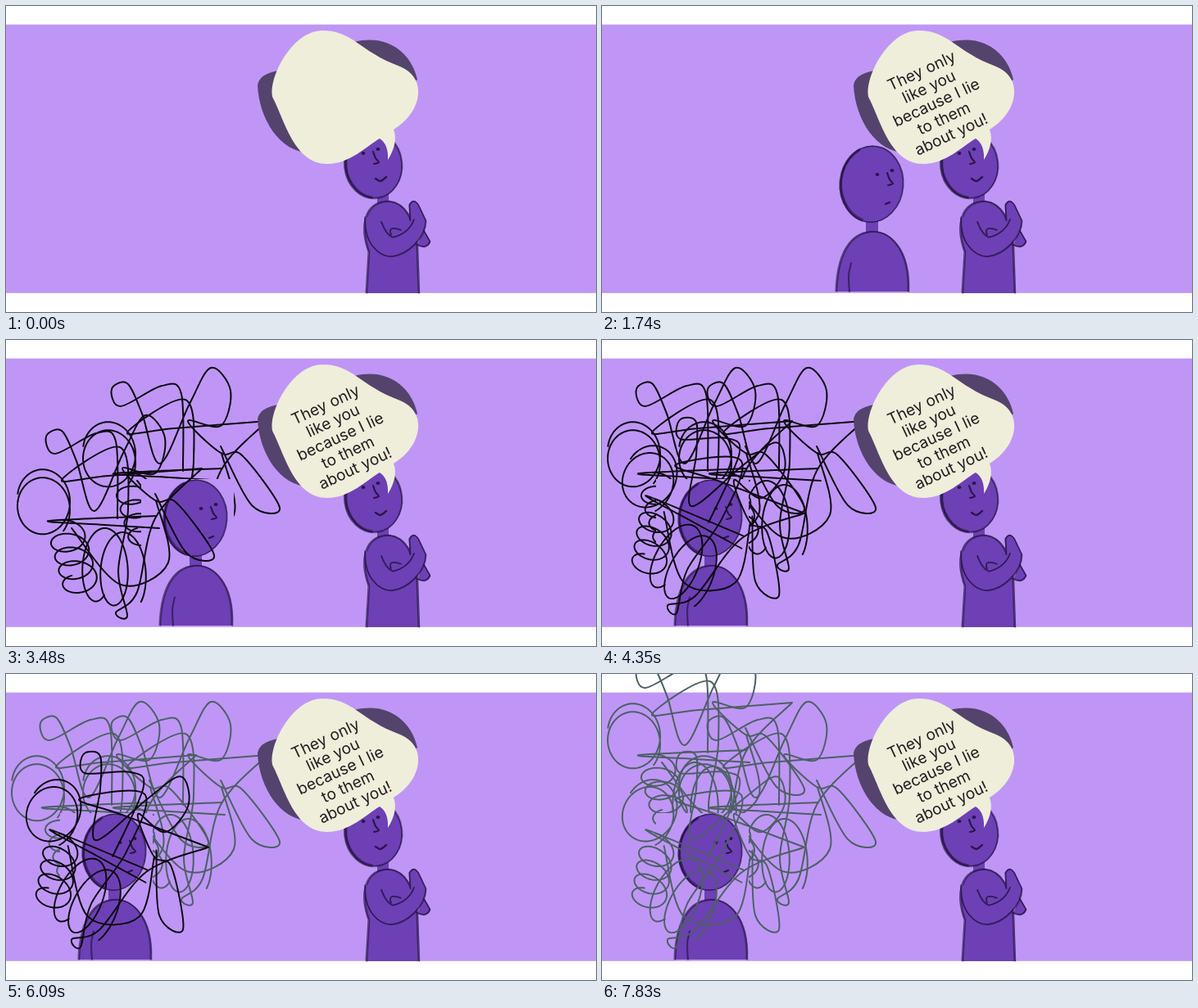
Write an HTML page with a canvas that moves like this. It is 720x374 px and loops after 8 s.

```html
<!DOCTYPE html>
<html lang="en">
<head>
<meta charset="utf-8">
<title>Speech bubble and tangled thoughts</title>
<style>
  html, body { margin: 0; width: 100%; height: 100%; overflow: hidden; background: #fff; }
  canvas { display: block; }
</style>
</head>
<body>
<canvas id="stage" width="720" height="374"></canvas>
<script>
const ctx = document.getElementById('stage').getContext('2d');
const LOOP = 8000, STEP = 870;
const LILAC = '#bf96f6', SKIN = '#6d40b6', INK = '#281646';
const CREAM = '#efeeda', SHADE = '#54436c', BLACK = '#0b0810', SLATE = '#4c6064';
const LINES = ['They only', 'like you', 'because I lie', 'to them', 'about you!'];

let seed;
const random = () => (seed = (seed * 16807) % 2147483647) / 2147483647;
const mix = (a, b, t) => a + (b - a) * t;

// Smooth line through key points given as x, y pairs.
function thread(...p) {
  const path = new Path2D(), n = p.length / 2;
  const at = i => {
    const k = 2 * Math.max(0, Math.min(n - 1, i));
    return [p[k], p[k + 1]];
  };
  path.moveTo(p[0], p[1]);
  for (let i = 0; i < n - 1; i++) {
    const [a, b, c, d] = [-1, 0, 1, 2].map(k => at(i + k));
    path.bezierCurveTo(
      b[0] + (c[0] - a[0]) / 6, b[1] + (c[1] - a[1]) / 6,
      c[0] - (d[0] - b[0]) / 6, c[1] - (d[1] - b[1]) / 6, ...c);
  }
  return path;
}

// Elliptic loops whose centre drifts from one point to another.
function coil(x0, y0, x1, y1, rx, ry, turns, start = 0) {
  const path = new Path2D();
  for (let t = 0; t <= 1; t += 0.005) {
    const angle = start + t * turns * 2 * Math.PI;
    path.lineTo(mix(x0, x1, t) + rx * Math.cos(angle), mix(y0, y1, t) + ry * Math.sin(angle));
  }
  return path;
}

function oval(x, y, rx, ry, tilt = 0, from = 0, to = 2 * Math.PI) {
  const path = new Path2D();
  path.ellipse(x, y, rx, ry, tilt, from, to);
  return path;
}

const tangle = [
  thread(319, 99, 205, 108, 148, 113, 219, 73, 229, 148, 217, 225, 228, 279, 214, 275, 240, 250, 262, 160, 319, 99),
  thread(216, 160, 214, 66, 190, 56, 140, 81, 129, 60, 148, 53, 166, 90, 188, 151, 224, 78, 250, 34,
    274, 62, 262, 105, 222, 99, 262, 138, 288, 141, 334, 205, 300, 202, 262, 130),
  thread(263, 157, 132, 163, 200, 168, 267, 172),
  thread(160, 172, 220, 241, 278, 214, 263, 138),
  coil(126, 135, 126, 151, 32, 37, 1.6, -3),
  coil(153, 176, 172, 243, 22, 15, 4, -2),
  coil(188, 215, 232, 225, 22, 46, 2, 1)
];

const listenerBody = new Path2D('M286 349C288 290 312 276 331 276S376 295 374 349');
const speakerTorso = new Path2D('M440 351L443 301C432 270 437 239 468 239Q496 242 502 294L504 351');
const foldedArm = new Path2D('M438 258C436 290 455 306 470 306C490 304 512 283 512 262L503 243Q497 234 492 243L493 262');
const elbow = new Path2D('M510 274L518 288Q514 298 502 292');
const armFolds = new Path2D('M458 264Q464 280 472 283Q492 278 498 261M470 280Q465 268 482 274');
const bubbleShade = new Path2D('M307 97Q309 83 332 79L425 44C470 33 496 62 502 90L371 179C336 180 309 140 307 97');
const bubbleShape = new Path2D('M386 30C424 30 430 55 481 74C515 88 508 130 473 151Q479 167 466 188Q467 169 456 162C440 171 420 193 392 193C352 193 340 140 326 113C318 92 348 30 386 30');

function fill(path, color) {
  ctx.fillStyle = color;
  ctx.fill(path);
}

// Pencil line: several thin, slightly shifted passes.
function pencil(path, spread = 0.8, passes = 3) {
  const shift = () => (random() * 2 - 1) * spread;
  ctx.strokeStyle = INK;
  ctx.lineWidth = 1.2;
  ctx.globalAlpha = 0.5;
  for (let i = 0; i < passes; i++) {
    ctx.save();
    ctx.translate(shift(), shift());
    ctx.stroke(path);
    ctx.restore();
  }
  ctx.globalAlpha = 1;
}

function head(x, y, rx, ry, tilt) {
  fill(oval(x, y, rx, ry, tilt), SKIN);
  pencil(oval(x, y, rx, ry, tilt));
  pencil(oval(x + 1, y, rx, ry, tilt, 1.8, 4.2), 1.6, 6);
}

function face(x, y) {
  fill(oval(x - 9, y + 2, 2.4, 2), INK);
  fill(oval(x + 9, y - 3, 2.5, 2), INK);
  ctx.strokeStyle = INK;
  ctx.lineWidth = 2.1;
  ctx.stroke(thread(x + 3, y, x + 6, y + 8, x + 10, y + 13, x + 4, y + 15));
}

function mouth(...points) {
  ctx.strokeStyle = INK;
  ctx.lineWidth = 2.4;
  ctx.stroke(thread(...points));
}

function listener(dx) {
  seed = 71;
  ctx.save();
  ctx.translate(dx, 0);
  ctx.fillStyle = LILAC;
  ctx.fillRect(263, 170, 113, 180);
  ctx.fillStyle = SKIN;
  ctx.fillRect(322, 260, 15, 20);
  fill(listenerBody, SKIN);
  pencil(listenerBody, 1.1, 4);
  pencil(thread(304, 314, 301, 330, 302, 349), 0.6);
  head(329, 217.5, 38.5, 46.5, 0.08);
  face(345, 204);
  mouth(346, 242, 351, 240);
  ctx.restore();
}

function speaker() {
  seed = 193;
  ctx.fillStyle = SKIN;
  ctx.fillRect(453, 228, 14, 18);
  [speakerTorso, elbow, foldedArm].forEach(part => {
    fill(part, SKIN);
    pencil(part, 0.9, 4);
  });
  pencil(armFolds, 0.7, 4);
  head(448.5, 194, 35, 41, -0.12);
  face(445, 178);
  mouth(451, 211, 457, 214, 464, 209);
}

function bubble(withText) {
  fill(bubbleShade, SHADE);
  fill(bubbleShape, CREAM);
  if (!withText) return;
  ctx.save();
  ctx.translate(408, 118);
  ctx.rotate(-25 * Math.PI / 180);
  ctx.font = '19.2px Inter, Arial, sans-serif';
  ctx.textAlign = 'center';
  ctx.fillStyle = '#211e22';
  LINES.forEach((line, i) => ctx.fillText(line, 0, (i - 2) * 21.4 + 6.5));
  ctx.restore();
}

// Turns and scales around the small loop at the top left.
function scribble(color, dx = 0, dy = 0, angle = 0, scale = 1) {
  ctx.save();
  ctx.translate(128 + dx, 55 + dy);
  ctx.rotate(angle);
  ctx.scale(scale, scale);
  ctx.translate(-128, -55);
  ctx.strokeStyle = color;
  ctx.lineWidth = 2;
  tangle.forEach(path => ctx.stroke(path));
  ctx.restore();
}

function draw(time) {
  const step = Math.floor(time / STEP);
  const outer = step >= 7 ? SLATE : BLACK;
  const inner = step === 6 || step >= 8 ? SLATE : BLACK;
  ctx.fillStyle = '#fff';
  ctx.fillRect(0, 0, 720, 374);
  ctx.fillStyle = LILAC;
  ctx.fillRect(0, 22.6, 720, 328.2);
  ctx.lineCap = ctx.lineJoin = 'round';

  if (step >= 3) scribble(outer);
  if (step >= 5) scribble(outer, -87, step >= 9 ? -64 : 0);
  if (step >= 1) listener(step >= 5 ? -197 : step === 4 ? -98 : 0);
  if (step === 4) scribble(BLACK, -80, 58);
  if (step >= 5) scribble(inner, -32, 38, 0.44, 0.98);
  speaker();
  bubble(step >= 2);
}

function frame(now) {
  draw(now % LOOP);
  requestAnimationFrame(frame);
}
draw(0);
requestAnimationFrame(frame);
</script>
</body>
</html>
```
